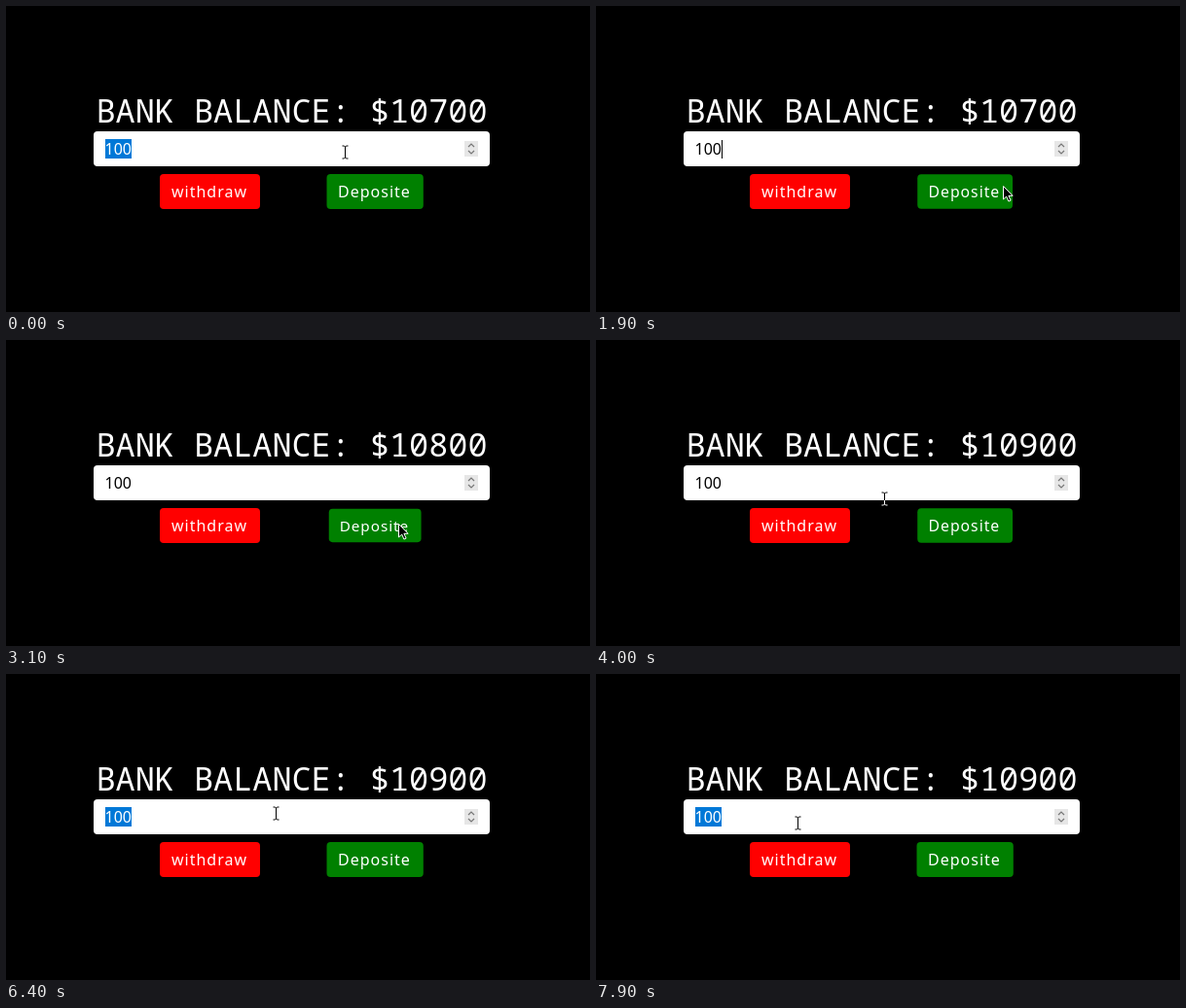
Recreate the animation shown at these times as an HTML page. Size 600x315 px, loop 8 s.

```html
<!DOCTYPE html>
<html lang="en">
<head>
<meta charset="utf-8">
<title>Bank balance</title>
<style>
  html, body { margin: 0; width: 100%; height: 100%; overflow: hidden; background: #000; }
  svg { display: block; width: 600px; height: 315px; background: #000; }
  text { font: 16px "Noto Sans", "Open Sans", sans-serif; fill: #fff; white-space: pre; }
  #title { font: 33.5px "Noto Sans Mono", monospace; }
  .label { letter-spacing: 1px; }
  #beam { fill: none; stroke: #fff; mix-blend-mode: difference; }
</style>
</head>
<body>
<svg viewBox="0 0 600 315">
  <text id="title" x="92.5" y="119.5"></text>
  <rect x="90" y="129" width="407" height="36" rx="4" fill="#fff"/>
  <rect id="selection" x="102" y="137" width="27" height="20" fill="#0078d7"/>
  <text id="amount" x="101.5" y="153">100</text>
  <path id="caret" d="M129.5 138V157" stroke="#000"/>
  <rect x="471" y="139" width="14" height="16" fill="#e6e6e6"/>
  <path d="M475 145l3-3 3 3M475 149l3 3 3-3" fill="none" stroke="#777" stroke-width="1.2"/>
  <rect x="158" y="173" width="103" height="36" rx="4" fill="#f00"/>
  <text class="label" x="170" y="197">withdraw</text>
  <g id="deposit">
    <rect x="329.5" y="173" width="99.3" height="36" rx="4" fill="#008000"/>
    <text class="label" x="341" y="197">Deposite</text>
  </g>
  <path id="beam" d="M-3 -6.5H-1L0 -5.5L1 -6.5H3M0 -5.5V5.5M-3 6.5H-1L0 5.5L1 6.5H3"/>
  <path id="arrow" d="M0 0V13.5L3.2 10.6L5.4 15.6L7.6 14.6L5.4 9.8H9.6Z" fill="#000" stroke="#fff"/>
</svg>
<script>
const LOOP = 8000, STEP = 100;
const el = id => document.getElementById(id);

// Keyframes: time, then values
const pointer = [
  [0, 348, 150], [400, 348, 150], [900, 415, 185], [1200, 415, 187],
  [1600, 432, 187], [1800, 428, 186], [1900, 418, 186], [2100, 418, 188],
  [2600, 403, 190], [3800, 403, 190], [4000, 296, 163], [4400, 277, 143],
  [6500, 277, 143], [7100, 270, 289], [7300, 270, 289], [7600, 266, 158],
  [7900, 207, 153]
];
const press = [
  [0, 1], [1000, 1], [1200, .955], [1500, .955], [1700, 1], [1800, 1],
  [1900, .985], [2100, .955], [3800, .955], [4000, .985], [4100, 1]
];

function sample(keys, t) {
  const next = keys.findIndex(k => k[0] > t);
  if (next < 0) return keys.at(-1).slice(1);
  const a = keys[next - 1], b = keys[next];
  const u = (t - a[0]) / (b[0] - a[0]), s = u * u * (3 - 2 * u);
  return a.slice(1).map((v, i) => v + (b[i + 1] - v) * s);
}

const show = (id, on) => el(id).setAttribute("visibility", on ? "visible" : "hidden");
const between = (t, from, to) => t >= from && t < to;

function draw(now) {
  const t = Math.floor(now % LOOP / STEP) * STEP;
  const balance = t < 2900 ? 10700 : t < 3800 ? 10800 : 10900;
  el("title").textContent = `BANK BALANCE: $${balance}`;

  const selected = t < 400 || between(t, 4800, 5100) || t >= 5700;
  const focused = between(t, 400, 2800) || between(t, 5100, 5700);
  const blink = (t < 2800 ? t - 700 : t - 5100) % 1060;
  show("selection", selected);
  show("caret", focused && blink < 530);
  el("amount").style.fill = selected ? "#fff" : "#000";

  const [scale] = sample(press, t);
  el("deposit").setAttribute("transform",
    `translate(379.2 191) scale(${scale}) translate(-379.2 -191)`);

  const [x, y] = sample(pointer, t).map(Math.round);
  const inField = between(y, 129, 165);
  show("beam", inField);
  show("arrow", !inField);
  el("beam").setAttribute("transform", `translate(${x + .5} ${y + .5})`);
  el("arrow").setAttribute("transform", `translate(${x + .5} ${y - .5})`);
}

const start = performance.now();
function tick() {
  draw(performance.now() - start);
  requestAnimationFrame(tick);
}
tick();
</script>
</body>
</html>
```
